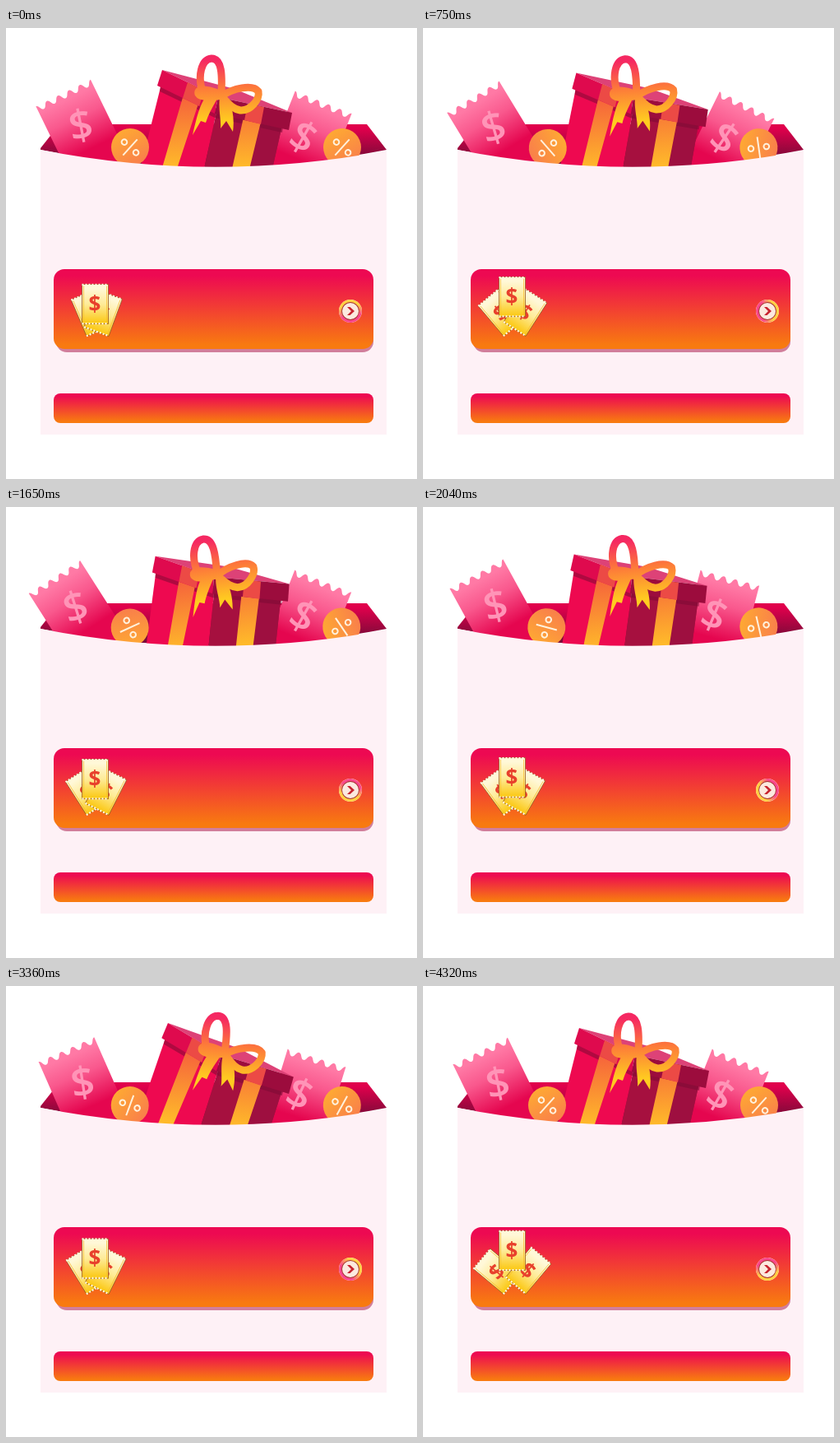
An HTML page for the animation above (4.52 s loop, 500 by 548 pixels).

```html
<!DOCTYPE html>
<html lang="en">
<head>
<meta charset="utf-8">
<title>Gift envelope</title>
<style>
html, body { margin: 0; width: 100%; height: 100%; overflow: hidden; background: #fff; }
svg { display: block; }
text { font-family: "Open Sans", "Noto Sans", sans-serif; text-anchor: middle; }
</style>
</head>
<body>
<svg width="500" height="548" viewBox="0 0 500 548">
  <defs>
    <linearGradient id="flap" x2="0" y2="1"><stop offset=".1" stop-color="#e0004c"/><stop offset=".8" stop-color="#7c0a38"/></linearGradient>
    <linearGradient id="panel" x2="0" y2="1"><stop offset=".08" stop-color="#ed0952"/><stop offset=".95" stop-color="#f87a10"/></linearGradient>
    <linearGradient id="pink" x2="0" y2="1"><stop offset=".08" stop-color="#ff79a5"/><stop offset=".32" stop-color="#f9588d"/><stop offset=".7" stop-color="#e5064f"/></linearGradient>
    <linearGradient id="coin" x2=".6" y2="1"><stop offset="0" stop-color="#ffb02f"/><stop offset="1" stop-color="#f9804a"/></linearGradient>
    <linearGradient id="band" gradientUnits="userSpaceOnUse" x1="0" y1="66" x2="0" y2="168"><stop offset="0" stop-color="#f4503f"/><stop offset="1" stop-color="#ffb92a"/></linearGradient>
    <linearGradient id="bow" gradientUnits="userSpaceOnUse" x1="0" y1="35" x2="0" y2="126"><stop offset=".05" stop-color="#f52862"/><stop offset=".42" stop-color="#fd7b39"/><stop offset=".85" stop-color="#ffcb20"/></linearGradient>
    <linearGradient id="gold" x2="0" y2="1"><stop offset=".1" stop-color="#fff8d8"/><stop offset=".5" stop-color="#feeb98"/><stop offset="1" stop-color="#fbc70f"/></linearGradient>
    <linearGradient id="ring" x2="0" y2="1"><stop offset=".25" stop-color="#ffd043"/><stop offset=".75" stop-color="#f8468c"/></linearGradient>

    <g id="percent" fill="none" stroke="#fff1dc" stroke-width="2">
      <circle r="23" fill="url(#coin)" stroke="none"/>
      <g transform="rotate(42)">
        <path d="M0-13V13"/><circle cx="-9.5" r="3.3"/><circle cx="9.5" r="3.3"/>
      </g>
    </g>
    <g id="voucher">
      <rect width="32" height="48" fill="url(#gold)" stroke="#9a5a20" stroke-width=".8"/>
      <path d="M0 .3H32M0 47.7H32" stroke="#fff8e2" stroke-width="2.2" stroke-dasharray="2 2"/>
      <path d="M2 2V46M30 2V46" stroke="#f6b92c" stroke-width=".7"/>
      <text x="15.5" y="33" font-size="26" font-weight="700" fill="#e8402c">$</text>
    </g>
  </defs>

  <path d="M42 148V146L65 117H439L463 148Q252 189 42 148Z" fill="url(#flap)"/>
  <g id="ticketL"><path class="ticket" fill="url(#pink)"/>
    <text transform="translate(2 -63.5) rotate(15)" y="18" font-size="51" font-weight="600" fill="#ff94b7">$</text></g>
  <g id="ticketR"><path class="ticket" fill="url(#pink)" transform="translate(-1.6 -2)"/>
    <text transform="translate(-8.6 -62) rotate(8)" y="18" font-size="51" font-weight="600" fill="#ff94b7">$</text></g>

  <g id="gift">
    <path d="M189 68L257 98L239 180H161Z" fill="#ee0950"/>
    <path d="M257 98L336 118L322 180H239Z" fill="#a6103f"/>
    <path d="M308 112L336 118L322 180H291Z" fill="#9e0f40"/>
    <path d="M188 71L255 102L337 121L336 127L254 109L187 77Z" fill="#7d0a34" opacity=".55"/>
    <path d="M216 81L235 89L205 180H187ZM290 104L311 110L294 180H273Z" fill="url(#band)"/>
    <path d="M190 51L278 74L348 103L258 84Z" fill="#dd4277"/>
    <path d="M190 51L258 84L254 104L184 70Z" fill="#df0a4e"/>
    <path d="M258 84L348 103L344 124L254 104Z" fill="#9c0c3d"/>
    <path d="M221 66L241 76L235 95L215 85ZM294 92L314 96L310 117L290 112Z" fill="#ec4a45"/>
    <g fill="none" stroke="url(#bow)" stroke-width="9" stroke-linejoin="round">
      <path d="M240 80C232 58 238 38 250 37C263 37 263 58 262 80"/>
      <path d="M262 83C276 73 300 68 307 77C309 87 297 101 285 100C274 98 269 89 262 83"/>
      <path d="M264 82C250 84 237 85 234 80C232 73 246 73 264 82"/>
    </g>
    <path d="M244 82C236 92 232 108 227 130L237 113L243 115C246 105 252 95 257 86ZM260 85C258 98 262 112 261 122L268 113L276 126C278 112 276 98 271 86Z" fill="url(#bow)"/>
  </g>

  <use id="coinL" href="#percent"/>
  <use id="coinR" href="#percent"/>
  <path d="M42 148Q252 189 463 149V494H42Z" fill="#fef1f6"/>

  <rect x="61" y="300" width="386" height="94" rx="13" fill="#d17e9b"/>
  <rect x="58" y="293" width="389" height="97" rx="13" fill="url(#panel)"/>
  <rect x="58" y="444" width="389" height="36" rx="8" fill="url(#panel)"/>
  <g id="sideL"><use href="#voucher" y="-48"/></g>
  <g id="sideR"><use href="#voucher" x="-32" y="-48"/></g>
  <use id="middle" href="#voucher"/>

  <g transform="translate(419 344)">
    <circle r="14" fill="#fff0d0"/>
    <g id="spinner"><circle r="12.4" fill="#a8342f" stroke="url(#ring)" stroke-width="3"/></g>
    <circle r="10" fill="#fce9df"/>
    <path d="M-4-5H-.5L5 0L-.5 5H-4L1 0Z" fill="#c8232f"/>
  </g>
</svg>
<script>
const LOOP = 4520, END = 4320, STEP = 30;
const times = [0, 750, 1230, 2040, 2700, 3360, END];

// poses at the times above, joined by smooth curves
const sway = {
  gift: [0, -2.7, -6.8, -4.9, 1.5, 5, 0],
  ticketL: [0, -5.3, -9.5, -2.8, 1.5, 2.2, 0],
  ticketR: [0, 4.5, 6.6, -7, -10.4, -4.5, 0],
  coinR: [0, -50, -90, -55, -30, -13, 0],
  spread: [0, .63, .26, .48, .55, .31, 1]
};

function slope(v, i) {
  const a = Math.max(i - 1, 0), b = Math.min(i + 1, v.length - 1);
  return (v[b] - v[a]) / (times[b] - times[a]);
}

function at(v, t) {
  let i = 0;
  while (i < times.length - 2 && t >= times[i + 1]) i++;
  const d = times[i + 1] - times[i], u = (t - times[i]) / d, w = 1 - u;
  return v[i] * w * w * (1 + 2 * u) + v[i + 1] * u * u * (3 - 2 * u)
    + d * u * w * (slope(v, i) * w - slope(v, i + 1) * u);
}

const place = (id, x, y, angle = 0) =>
  document.getElementById(id).setAttribute("transform", `translate(${x} ${y}) rotate(${angle})`);

const wave = "c3.7 0 3.7 7 7.4 7s3.7-7 7.4-7".repeat(5);
document.querySelectorAll(".ticket").forEach(p => p.setAttribute("d", `M-37-108${wave}V0H-37Z`));

// the small offset makes a coin wobble around its axle
function coin(id, x, y, turn) {
  const a = turn * Math.PI / 180;
  place(id, x + .8 * Math.sin(a), y - .8 * Math.cos(a), turn);
}

function draw(now) {
  const t = Math.min(Math.floor(now % LOOP / STEP) * STEP, END);
  const pose = name => at(sway[name], t);

  document.getElementById("gift").setAttribute("transform", `rotate(${pose("gift")} 263 128)`);
  place("ticketL", 117, 176, pose("ticketL") - 26);
  place("ticketR", 347, 193, pose("ticketR") + 21.7);
  coin("coinL", 151, 145.8, 360 * Math.sin(t / END * Math.PI / 2));
  coin("coinR", 409, 145.8, pose("coinR"));

  const p = pose("spread");
  place("sideL", 98, 374.5, -23 - 27 * p);
  place("sideR", 125, 374.5, 20 + 20 * p);
  place("middle", 92.5, 311.5 - 14 * p);
  place("spinner", 0, 0, t / END * 540 - 10);
  requestAnimationFrame(() => draw(performance.now()));
}
draw(0);
</script>
</body>
</html>
```
